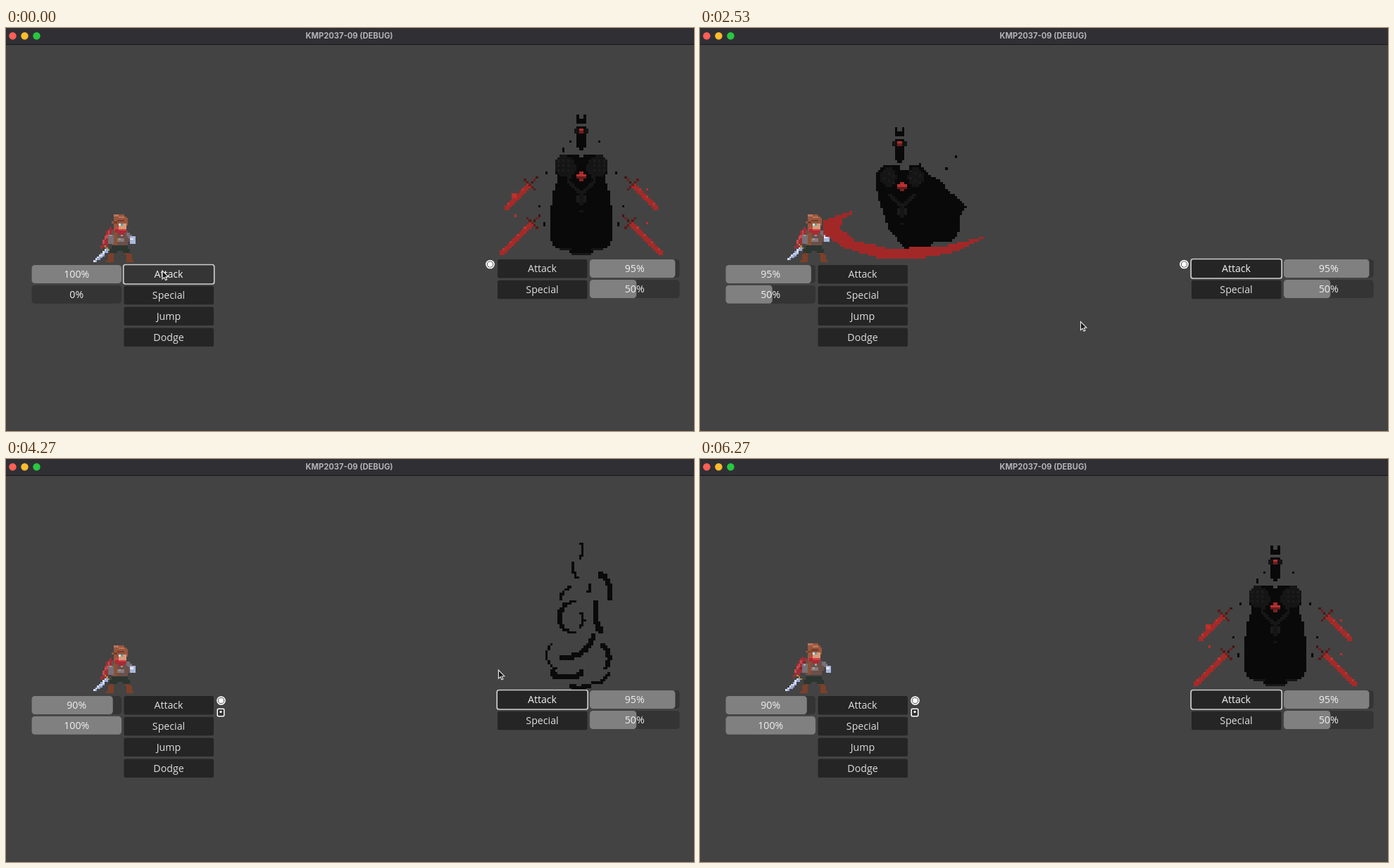
Recreate the animation shown at these times as an HTML page with a canvas. Size 977 px wide and 573 px high, loop 6.34 s.

```html
<!DOCTYPE html>
<html lang="en">
<head>
<meta charset="utf-8">
<title>Battle prototype</title>
<style>
html, body { margin: 0; width: 100%; height: 100%; overflow: hidden; background: #434343; }
canvas { display: block; }
</style>
</head>
<body>
<canvas id="stage" width="977" height="573"></canvas>
<script>
const ctx = document.getElementById('stage').getContext('2d');
const LOOP = 6340, CELL = 3.4, INK = '#090909', BG = '#434343';
const frac = v => v - Math.floor(v);
const clamp = v => Math.max(0, Math.min(1, v));
const span = (t, a, b) => clamp((t - a) / (b - a));

// Pixel-art brush: shapes snap to a lattice at (ox, oy), shifted by (dx, dy).
function grid(ox, oy, s, dx = 0, dy = 0) {
  const box = (c, x, y, w = 1, h = 1) => {
    const l = Math.round(ox + dx + x * s), t = Math.round(oy + dy + y * s);
    ctx.fillStyle = c;
    ctx.fillRect(l, t, Math.round(ox + dx + (x + w) * s) - l, Math.round(oy + dy + (y + h) * s) - t);
  };
  const pair = (c, x, y, w = 1, h = 1) => { box(c, x, y, w, h); box(c, -x - w, y, w, h); };
  const cells = pts => {
    const p = [];
    for (let i = 0; i < pts.length; i += 2) p.push([(pts[i] - ox) / s, (pts[i + 1] - oy) / s]);
    return p;
  };
  const poly = (c, pts) => {
    const p = cells(pts), ys = p.map(q => q[1]);
    for (let y = Math.floor(Math.min(...ys)); y < Math.max(...ys); y++) {
      const hits = [], cy = y + 0.5;
      p.forEach((a, i) => {
        const b = p[(i + 1) % p.length];
        if ((a[1] > cy) !== (b[1] > cy)) hits.push(a[0] + (cy - a[1]) / (b[1] - a[1]) * (b[0] - a[0]));
      });
      hits.sort((a, b) => a - b);
      for (let i = 0; i + 1 < hits.length; i += 2) {
        const l = Math.round(hits[i]), r = Math.round(hits[i + 1]);
        if (r > l) box(c, l, y, r - l, 1);
      }
    }
  };
  const rect = (c, l, t, r, b) => poly(c, [l, t, r, t, r, b, l, b]);
  const oval = (c, x, y, rx, ry) => poly(c, arc(x, y, rx, ry, 0, 360));
  const line = (c, pts, w = 1, h = 1) => cells(pts).forEach((b, i, p) => {
    const a = p[i - 1] || b, n = Math.max(1, Math.ceil(Math.max(Math.abs(b[0] - a[0]), Math.abs(b[1] - a[1]))));
    for (let k = 0; k <= n; k++)
      box(c, Math.floor(a[0] + (b[0] - a[0]) * k / n), Math.floor(a[1] + (b[1] - a[1]) * k / n), w, h);
  });
  const dots = (c, pts) => cells(pts).forEach(p => box(c, Math.floor(p[0]), Math.floor(p[1])));
  return { box, pair, poly, rect, oval, line, dots };
}

function arc(x, y, rx, ry, from, to) {
  const pts = [];
  for (let i = 0; i <= 20; i++) {
    const a = (from + (to - from) * i / 20) * Math.PI / 180;
    pts.push(x + rx * Math.cos(a), y + ry * Math.sin(a));
  }
  return pts;
}

function clipped(x, y, w, h, draw) {
  ctx.save();
  ctx.beginPath();
  ctx.rect(x, y, w, h);
  ctx.clip();
  draw();
  ctx.restore();
}

// ---------- interface ----------
function round(x, y, w, h, r, fill) {
  ctx.beginPath();
  ctx.roundRect(x, y, w, h, r);
  ctx.fillStyle = fill;
  ctx.fill();
}

function disc(x, y, r, fill) {
  ctx.beginPath();
  ctx.arc(x, y, r, 0, 7);
  ctx.fillStyle = fill;
  ctx.fill();
}

function label(text, x, y, color, font = '14.2px "Open Sans", "Noto Sans", sans-serif') {
  ctx.font = font;
  ctx.textAlign = 'center';
  ctx.fillStyle = color;
  ctx.fillText(text, x, y);
}

function button(text, x, y, focus, mouse) {
  const over = mouse && mouse[0] > x && mouse[0] < x + 128 && mouse[1] > y && mouse[1] < y + 27;
  round(x, y, 127.5, 26.5, 2.5, over ? '#353535' : '#252525');
  if (focus) {
    ctx.beginPath();
    ctx.roundRect(x - 0.8, y - 0.5, 129, 27.5, 3);
    ctx.strokeStyle = '#cdcdcd';
    ctx.lineWidth = 1.7;
    ctx.stroke();
  }
  label(text, x + 63.5, y + 18.3, focus || over ? '#f2f2f2' : '#dfdfdf');
}

function bar(value, x, y) {
  round(x, y, 127.5, 26, 4.5, '#343434');
  if (value) round(x, y, 5 + 122.5 * value / 100, 26, 4.5, '#808080');
  label(value + '%', x + 63.7, y + 18.2, '#f0f0f0');
}

function ringIcon(x, y) {
  disc(x, y, 6.3, '#fff');
  disc(x, y, 4.6, '#333');
  disc(x, y, 3.8, '#fff');
}

function boxIcon(x, y) {
  round(x - 5.5, y - 6, 11, 12, 2, '#fff');
  round(x - 4, y - 4.5, 8, 9, 1, '#333');
  round(x - 1.5, y - 2.5, 3, 3, 1, '#fff');
}

function titleBar() {
  ctx.fillStyle = '#303034';
  ctx.fillRect(0, 0, 977, 23);
  ctx.fillStyle = '#18181a';
  ctx.fillRect(0, 23, 977, 1);
  ['#ff5f57', '#febc2e', '#28c840'].forEach((c, i) => disc(9.5 + 17 * i, 11.3, 5.2, c));
  label('KMP2037-09 (DEBUG)', 487.5, 15, '#b4b4b6', '700 11.2px Inter, Roboto, sans-serif');
}

// start, end, then where the pointer goes
const MOVES = [
  [80, 620, 763.5, 340], [1720, 2000, 705, 411], [2000, 2300, 540.5, 417.5],
  [2800, 3300, 421, 386.5], [3700, 4600, 820.5, 262.5], [5400, 5700, 815, 30]
];
function mouseAt(t) {
  if (t >= 5700) return null;
  let x = 222, y = 345;
  for (const [a, b, mx, my] of MOVES) {
    const k = span(t, a, b), e = k * k * (3 - 2 * k);
    x += (mx - x) * e;
    y += (my - y) * e;
  }
  return [x, y];
}

function pointer([x, y]) {
  ctx.beginPath();
  [[0, 0], [0, 12], [2.7, 9.6], [4.6, 13.6], [6.5, 12.8], [4.8, 8.9], [8.4, 8.6]]
    .forEach(p => ctx.lineTo(x + p[0], y + p[1]));
  ctx.closePath();
  ctx.fillStyle = '#151515';
  ctx.fill();
  ctx.strokeStyle = '#eee';
  ctx.lineWidth = 1.1;
  ctx.stroke();
}

// ---------- hero ----------
function hero(t) {
  const S = 2.6, ph = frac(t / 800);
  const high = ph >= 0.4 && ph < 0.9, arm = ph >= 0.14 && ph < 0.9;
  const lift = high ? -S : 0, swing = arm ? -S : 0, wide = high ? S : 0;
  const at = (dx, dy) => grid(124, 265, S, dx, dy);

  const legs = at(0, 0);
  legs.poly('#2c3630', [150, 309, 173, 309, 177, 321, 162, 317, 147, 321]);
  legs.poly('#7b4029', [147, 319, 153, 320, 152, 332, 142, 333]);
  legs.poly('#7b4029', [169, 319, 176, 319, 181, 333, 171, 333]);

  const cape = at(-wide, lift);
  cape.poly('#9c2f36', [148, 283, 156, 287, 152, 296, 143, 312, 134, 314, 141, 292]);
  cape.line('#c94a4e', [147, 289, 138, 306]);
  cape.line('#6e2530', [152, 292, 146, 301]);

  const body = at(0, lift);
  body.poly('#6b5049', [149, 289, 173, 289, 177, 297, 172, 310, 151, 310]);
  body.rect('#777077', 145, 293, 152, 306);
  body.rect('#86797b', 159, 299, 168, 305);
  body.rect('#8a5134', 152, 292, 158, 309);
  body.dots('#a39aa1', [148, 296, 161, 301, 165, 296]);

  body.poly('#98563d', [155, 265, 168, 265, 173, 271, 173, 280, 160, 281, 160, 289, 153, 287, 151, 276]);
  body.line('#b9765a', [155, 266, 168, 269]);
  body.line('#713d2d', [154, 276, 168, 273]);
  body.rect('#d99b78', 160, 278, 171, 286);
  body.dots('#e8e4dc', [161, 280]);
  body.dots('#4c9fb0', [164, 280]);
  body.poly('#a92a35', [154, 284, 163, 286, 172, 284, 172, 290, 165, 294, 155, 291]);
  body.line('#cf4249', [157, 285, 169, 288]);

  const blade = at(-wide, swing);
  blade.line('#9aa7d4', [144, 315, 125, 332], 2, 1);
  blade.line('#d3dcf4', [142, 316, 125, 331]);
  blade.line('#a29446', [140, 311, 145, 316]);

  const hand = at(wide, swing);
  hand.line('#777077', [172, 293, 177, 297], 2, 2);
  hand.rect('#a9b7dc', 175, 297, 183, 306);
  hand.dots('#e3eafa', [177, 299, 180, 299]);
}

// ---------- enemy ----------
const SIDE = [817, 186, 813, 180, 793, 180, 779, 192, 779, 206, 785, 214, 776, 234, 773, 268, 773, 300,
  778, 311, 803, 319, 803, 322, 817, 322];
const mirror = pts => pts.map((v, i) => i % 2 ? v : 1634 - v);

function sword(g, x, y, n) {
  for (let i = 0; i < n; i++) {
    g.pair('#a52a28', x + i, y - i, 2, 2);
    if (i % 3 === 1) g.pair('#bd3430', x + i, y - i);
  }
  const ex = x + n, ey = y - n;
  for (let i = -2; i < 3; i++) g.pair('#5a1917', ex + i, ey + i + 1);
  for (let i = 0; i < 4; i++) g.pair(i % 2 ? '#421514' : '#6b1f1c', ex + i, ey - i + 1);
}

function eye(g, x, y) {
  ['#a82a2a', '#b93030', '#641c1c', '#7a2222'].forEach((c, i) => {
    const r = i % 3 ? 2 : 1;
    g.box(c, x - r, y + i, 2 * r, 1);
  });
}

function head(g, x) {
  g.box(INK, x, 0, 1, 3);
  g.box(INK, x + 3, 0, 1, 3);
  g.box(INK, x, 2, 4, 2);
  g.box(INK, x, 5, 4, 9);
  g.box('#131313', x - 1, 6, 6, 2);
  g.box(INK, x + 1, 14, 2, 1);
  g.box('#b02e2c', x + 1, 6, 2, 1);
  g.box('#6d1f1f', x + 1, 7, 2, 1);
}

function chest(g) {
  for (let i = 0; i < 5; i++) g.pair('#171717', -6 + i, 28 + i, 2, 1);
  g.box('#1b1b1b', -2, 34, 4, 3);
  g.box('#151515', -1, 33, 2, 5);
  g.box('#141414', -1, 40, 2, 1);
}

function idle(t) {
  const ph = frac((t < 3000 ? t : t - 6270) / 1000);
  const swap = ph >= 0.35 && ph < 0.85, rise = ph >= 0.45 && ph < 0.95;
  const at = dy => grid(817, 122.5, CELL, 0, dy);

  const b = at(rise ? -CELL : 0);
  b.poly(INK, SIDE);
  b.poly(INK, mirror(SIDE));
  for (const x of [793, 841]) b.oval('#151515', x, 196, 15, 15);
  for (let i = 0; i < 9; i++) b.pair('#1d1d1d', -10 + i % 3 * 2, 19 + Math.floor(i / 3) * 2);
  for (let i = 0; i < 6; i++) b.pair('#161616', -3 - Math.floor(i / 1.4), 21 + i, 1, 2);
  chest(b);
  b.pair('#151515', -9, 56, 5, 1);
  b.box('#171717', -4, 58, 8, 1);
  eye(b, 0, 24);
  head(at(swap ? CELL : 0), -2);

  const s = at(swap ? -CELL : 0), red = '#bb302c';
  sword(s, -32, 38, 10);
  sword(s, -34, 57, 13);
  if (swap) s.dots(red, [719, 222, 711, 294, 711, 297, 725, 290, 709, 245]);
  else {
    s.dots(red, [723, 267, 911, 276, 911, 229]);
    s.dots(red, rise ? [719, 232, 711, 301, 711, 304, 925, 306] : [719, 235, 722, 238, 719, 239]);
  }

  const d = at(0);
  if (swap) {
    d.dots(INK, [788, 161, 829, 165, 832, 168, 799, 176]);
    d.pair(INK, -14, 28);
    d.pair(INK, -14, 36);
    d.pair(INK, -16, 42);
  } else {
    d.dots(INK, rise ? [842, 158, 789, 169, 787, 172, 829, 175] : [802, 162, 843, 162, 791, 171, 791, 174]);
    d.pair(INK, -18, rise ? 37 : 38);
    d.pair(INK, -16, 45, 1, rise ? 1 : 2);
    if (!rise) d.pair(INK, -15, 24);
  }
}

// Smoke curls: centre, radii, angles, cell width
const CURLS = [
  [817, 130, 6, 11, -80, 80, 1], [814, 150, 9, 19, 190, 100, 1],
  [836, 186, 15, 23, -85, 20, 2], [797, 198, 13, 15, 180, 265, 1],
  [821, 180, 4, 10, -10, 80, 1], [805, 225, 21, 22, 95, 270, 1.5],
  [812, 229, 9, 11, -60, 60, 1], [848, 213, 16, 32, 200, 115, 2],
  [793, 242, 43, 39, 12, 93, 2], [790, 279, 18, 20, 110, 225, 1],
  [840, 283, 18, 21, -60, 50, 1.5], [795, 299, 22, 10, 15, 165, 2],
  [836, 300, 21, 18, 10, 95, 1], [810, 316, 14, 8, 35, 145, 2]
];
function smoke(t, dx, top, bottom) {
  const sway = 7 * Math.sin(Math.floor((t - 1670) / 100) * 1.3), g = grid(817, 119, CELL, dx);
  clipped(0, top, 977, bottom - top, () => CURLS.forEach(([x, y, rx, ry, from, to, w]) =>
    g.line('#0a0a0a', arc(x + sway * Math.sin(y / 24), y, rx, ry, from, to), Math.round(w), Math.floor(w))));
}

const CLOAK = [249, 222, 270, 195, 310, 195, 322, 208, 340, 216, 352, 230, 378, 253, 370, 266, 368, 290,
  358, 302, 335, 303, 325, 312, 290, 313, 268, 285, 253, 240];
const SLASH = [217, 259, 176, 274, 174, 292, 205, 313, 255, 327, 310, 328, 365, 318, 407, 296,
  350, 309, 270, 314, 220, 302, 199, 285, 202, 272, 217, 264];

function striker(lunge) {
  const g = grid(287, 140.5, CELL, 0, lunge ? 0 : 7), d = grid(287, 140.5, CELL);
  if (lunge) g.poly(INK, CLOAK);
  else {
    g.oval(INK, 312, 262, 60, 49);
    g.rect(INK, 252, 214, 300, 276);
  }
  for (const x of [268, 306]) {
    g.oval(INK, x, 213, 18, 19);
    g.oval('#151515', x, 212, 11, 14);
    for (let i = 0; i < 6; i++) g.dots('#1c1c1c', [x - 7 + i % 3 * 7, 204 + i * 3]);
  }
  g.box(BG, -1, 16, 4, 2);
  chest(g);
  eye(g, 0, 23);
  head(g, -3);
  if (lunge) d.dots(INK, [363, 183, 350, 200, 312, 193]);
  else d.dots(INK, [309, 186, 350, 190, 353, 193, 363, 203, 319, 200, 322, 200, 384, 244, 381, 268, 384, 271]);
}

function slash(age) {
  if (age < 0 || age > 330) return;
  const right = 410 - 245 * span(age, 210, 330), left = 410 - 245 * span(age, 0, 80);
  clipped(left, 240, right - left, 100, () => grid(287, 140.5, CELL).poly('#a22828', SLASH));
}

function enemy(t) {
  const away = -152 * CELL, fade = (a, b) => 330 - 215 * span(t, a, b);
  if (t < 1450 || t >= 4450) idle(t);
  else if (t < 2100) smoke(t, 0, 110, fade(1900, 2100));
  else if (t < 2280) smoke(t, away, fade(2080, 2230), 330);
  else if (t < 3750) striker((t >= 2400 && t < 2750) || (t >= 2900 && t < 3250));
  else if (t < 4050) smoke(t, away, 110, fade(3870, 4050));
  else smoke(t, 0, fade(4030, 4210), 330);
}

// ---------- scene ----------
function draw(t) {
  const mouse = mouseAt(t), hits = (t >= 2480) + (t >= 3000), heroTurn = t >= 3850;
  ctx.fillStyle = BG;
  ctx.fillRect(0, 0, 977, 573);
  titleBar();

  enemy(t);
  hero(t);
  slash(t - 2400);
  slash(t - 2900);
  if (t >= 3300 && t < 3750) {
    const drop = Math.floor((t - 3600) / 100) * CELL;
    grid(287, 140.5, CELL, 0, drop).dots('#8f2929', [189, 203, 163, 234, 275, 300, 272, 303]);
  }

  bar(100 - 5 * hits, 36.5, 337);
  bar(50 * hits, 36.5, 365.8);
  ['Attack', 'Special', 'Jump', 'Dodge'].forEach((s, i) =>
    button(s, 167.5, 337 + i * 29.8, i === 0 && t < 1400, mouse));
  button('Attack', 698, 329, t >= 1400, mouse);
  button('Special', 698, 358.8, false, mouse);
  bar(95, 829, 329);
  bar(50, 829, 358);

  if (heroTurn) ringIcon(305.5, 343.5);
  else ringIcon(687.5, 336);
  if (t >= 3400) boxIcon(305, heroTurn ? 360.5 : 343.5);
  if (mouse) pointer(mouse);
}

const start = performance.now();
function tick(now) {
  draw(Math.max(0, now - start) % LOOP);
  requestAnimationFrame(tick);
}
draw(0);
requestAnimationFrame(tick);
</script>
</body>
</html>
```
